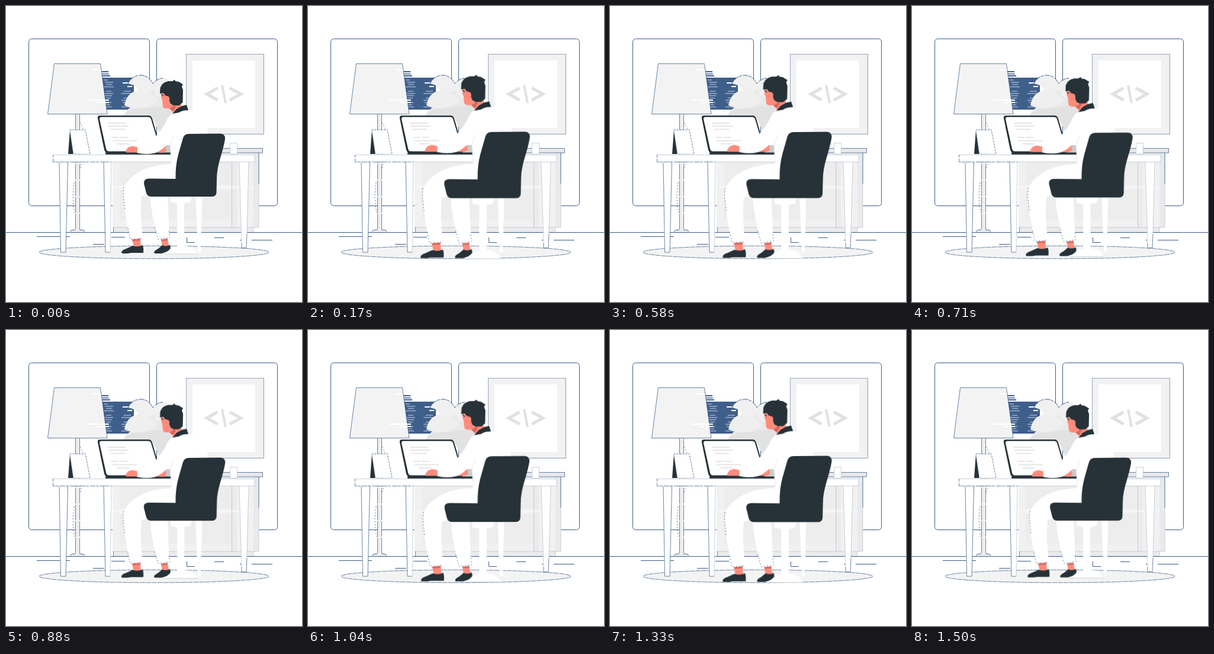
An HTML page that plays this animation: 500x500 px, repeating every 1540 ms.

```html
<!DOCTYPE html>
<html lang="en">
<head>
<meta charset="utf-8">
<title>Desk work</title>
<style>
  html, body { margin: 0; width: 100%; height: 100%; overflow: hidden; background: #fff; }
  svg { display: block; width: 100%; height: 100%; }
  #worker { transform-origin: 286px 275px; }
  .w { fill: #fff; }
  .g { fill: #f1f1f1; }
  .d { fill: #263238; }
  .s { fill: #ff8b7b; }
  .e { stroke: #3a5c8c; stroke-width: 1; }
  .t { stroke: #b4bfcf; stroke-width: .7; }
  .l { fill: none; }
  .thin { stroke-width: .75; }
  .dash { stroke-dasharray: 5 2 9 1; }
  .dot { stroke-dasharray: 2 3; stroke-width: .8; }
</style>
</head>
<body>
<svg viewBox="0 0 500 500">
  <!-- room -->
  <g class="w e">
    <rect x="38.5" y="55.5" width="204" height="282" rx="5"/>
    <rect x="254.5" y="55.5" width="204" height="282" rx="5"/>
  </g>
  <path class="l e" d="M0 382.5H500M52 389.5H108M147 402.5H166M178 390.5H201M415 395.5H450M395 395.5H405M305.500 391V399.500H319M352 391.5H368"/>
  <ellipse class="e thin" fill="#f3f3f3" cx="250" cy="416" rx="194" ry="10.8" stroke-dasharray="9 1"/>

  <!-- code panel -->
  <path fill="#3f5f8b" d="M157 121H216V175H157ZM160 110H173V112H160ZM161 114H174V115.500H161ZM162 117H176V119H162Z"/>
  <g id="code" class="l" stroke="#9cafc9" stroke-width="1.5"></g>
  <path class="l" stroke="#fff" stroke-width="2" d="M197 130H222M205 136H213"/>

  <!-- plant -->
  <path fill="#e9e9e9" d="M210 160L224 146L248 132L270 122L282 135L284 184L262 218L250 188H197Q203 174 216 168Z"/>
  <path fill="#e2e2e2" d="M198 185Q210 170 240 172L284 166L283 182L260 216L246 186Z"/>
  <path fill="#f0f0f0" d="M206 131Q214 116 230 117Q246 120 252 141Q236 151 223 145Q223 134 206 131Z"/>
  <path fill="#f0f0f0" d="M248 131Q257 121 267 122L276 128L266 158L252 151Z"/>
  <path fill="#efefef" d="M200 168Q204 146 222 143Q247 144 257 160Q238 175 218 173Q209 172 200 168Z"/>
  <path class="l e dash" d="M206 131Q214 116 230 117Q242 119 248 131Q257 121 267 122"/>

  <!-- lamp -->
  <path class="e thin" fill="#f3f3f3" d="M81.500 97.500H159.500L171 182.500H70.500Z"/>
  <path class="l" stroke="#fff" stroke-width="2" d="M146 108H160M137 159H174M153 163H174"/>
  <path fill="#eee" d="M117 183H124V378Q132 378 133 382H108Q110 378 117 378Z"/>
  <path class="l e thin" stroke-dasharray="26 2" d="M117.500 183V378M124.500 183V378"/>
  <path class="l e" d="M108 381Q110 378 117 378M124 378Q132 378 133 381"/>
  <path class="l e dot" d="M115 298L113 318L114 340L117 352M125 262L127 268L125 276M125 197L131 208"/>

  <!-- wall picture -->
  <rect fill="#f2f2f2" stroke="#7d90ae" stroke-width=".8" x="304.500" y="81.500" width="131" height="135"/>
  <path fill="#e9e9eb" d="M433.500 82H435V216H305V215H433.500Z"/>
  <rect class="w" x="315" y="92" width="106" height="114"/>
  <path class="l" stroke="#e1e1e1" stroke-width="5.3" d="M357.500 138.500L339.500 148.800L357.500 159M378 138.500L396.500 148.800L378 159"/>
  <path class="l" stroke="#e1e1e1" stroke-width="4" d="M365 134L371 164"/>

  <!-- cabinet -->
  <rect class="g" x="180" y="248" width="247" height="126"/>
  <path fill="#ededed" d="M192 263H381V302H192ZM192 311H381V362H192Z"/>
  <rect fill="#eaeaeb" x="418" y="248" width="9" height="126"/>
  <path fill="#ebebec" d="M182 374H418V382H182ZM381 263H390V374H381Z"/>
  <path class="l" stroke="#f5f5f5" stroke-width="4" d="M180 306H418"/>
  <path class="l t" d="M180 374H427V248M418 374V382M381.500 263V374"/>
  <path class="l e thin" d="M181.500 374V382M427 248V300"/>
  <rect class="e thin" fill="#e8e8ea" x="178" y="240.500" width="255.500" height="7.500"/>

  <!-- table -->
  <path class="w" d="M79 251H420V263H410L406 409H398L394 263H333L329 416H324L318 263H178L176 416H168L165 263H104L101 416H92L90 263H79Z"/>
  <path class="l e thin" d="M90 264L92.500 416H101L104.500 264M165 264L168 416H176M398 400V408.500H406L407 385"/>
  <path class="l t" d="M178 264L176 416M394 264L398 400M410 264L407 385M79.500 251.500H420V263.500H178"/>
  <path class="l e thin dash" d="M79.500 251V263.500H178"/>
  <path class="w t" d="M378.500 250V231.500H390.500V250Z"/>

  <!-- photo stand -->
  <path class="d" d="M108 209L114 250H105Z"/>
  <path class="w t" d="M108 209.500H134L142 250H114Z"/>
  <path class="l e dot" d="M108 209H134L142 250"/>

  <!-- laptop -->
  <path fill="#c9cbcc" d="M262 235H277L282 248H262Z"/>
  <path class="d" d="M159 185H241Q245 185 247 190L262 242Q263 248 258 249H174Q168 249 166 243L155 190Q154 185 159 185Z"/>
  <path class="w" d="M161 187.500H240Q244 187.500 245 191L260 241Q260 245.500 256 245.500H174Q170 245.500 169 241L158 191Q158 187.500 161 187.500Z"/>
  <path class="l" stroke="#e6e6e6" stroke-width="2" d="M172 198H202M173 203H207M176 208.500H201M178 222H190M192 222H205M180 227.500H221M187 233H208"/>
  <rect class="d" x="168" y="247.500" width="116" height="3.200" rx="1"/>

  <g id="worker">
    <!-- stool -->
    <path class="w" d="M266 419Q270 409 289 406V333L278 331V321H314L311 331L301 333V405Q320 406 323 419Z"/>
    <path class="l t" d="M266 419H323"/>

    <!-- legs -->
    <path class="w" d="M281 267Q246 268 225 280Q199 295 198 316Q199 345 210 393L231 391Q226 350 229 321L243 318Q245 352 257 394L276 391L273 318H300V267Z"/>
    <path class="l e dot" d="M199 306L198 318L201 345M206 376L210 394L231 392M251 374L257 394L277 391L275 378"/>
    <path class="s" d="M213 394.500L227 393L228 406L216 407ZM262 394.500L273 393L275 405L264 407Z"/>
    <path fill="#d5685f" d="M213 394.500L227 393V396L214 397ZM262 394.500L273 393V396L262.500 397Z"/>
    <path class="d" d="M195 416Q196 412 203 410L214 405Q222 408 231 404Q233 410 232 417H211L206 418H196ZM250 416Q251 413 257 410L264 404Q270 407 277 403.500L278 409Q275 414 269 416L263 418H251Z"/>

    <!-- far hand -->
    <path class="s" d="M254 247.500L262 239L269 234L271 245L265 248Z"/>

    <!-- neck and face -->
    <path class="s" d="M263 145L262 154L264 159L265 170Q267 174 276 173L283 180L297 171L294 150L276 142Z"/>
    <path fill="#d5685f" d="M276 173Q282 171 284 167L287 170L282 178Z"/>
    <path class="l" stroke="#263238" stroke-width="1.300" d="M262 149L266 152"/>

    <!-- shirt and near arm -->
    <path class="w" d="M282 181L307 176Q328 178 337 190L345 240L300 292L279 270L277 234H272Q264 243 253 248Q238 252 221 248V239Q239 235 248 225Q264 209 270 196Q275 184 282 181Z"/>
    <path class="l" stroke="#e4e4e4" stroke-width=".8" d="M277 237L283 221M278 239L279 264"/>
    <path class="s" d="M202 245L206 239L213 236.500L222 238.500V247.500H203Z"/>

    <!-- hair and collar -->
    <path class="d" d="M260 148L260.500 138L264 132L268 129L274 127H281L285 124.500L286 127L292 128L299 132.500L297 136L299 142L298.500 163L292 168H283L278 165L276 160Q274 152 269 151L266 147Z"/>
    <path class="s" d="M268 153Q274 150 276 155Q277 161 273 161Q269 160 268 153Z"/>
    <path class="d" d="M281 182L288 174L297 169L305 167L308 176Q298 176 292 180Z"/>

    <!-- chair -->
    <path class="d" d="M286.500 292Q286 270 291 251L299 223Q301 216 309 216L362 215.500Q371 216 370 225C366 249 356 268 356 292L355.500 315Q355 322 348 322H246Q239 322 237 316L233 300Q232 292 241 291.500Z"/>
  </g>
</svg>
<script>
  const LOOP = 1540, FRAMES = 37, FPS = 24;

  // [ms, scale], linear between entries
  const beats = [[0, 1], [300, 1.1], [890, 1], [1200, 1.095], [1500, 1], [LOOP, 1]];

  function scaleAt(ms) {
    const i = Math.max(1, beats.findIndex(b => b[0] >= ms));
    const [t0, a] = beats[i - 1], [t1, b] = beats[i];
    return a + (b - a) * (ms - t0) / (t1 - t0);
  }

  const pulse = Array.from({ length: FRAMES }, (_, k) => ({
    offset: Math.max(0, k / FRAMES - 4 / LOOP),
    transform: `scale(${scaleAt(k * 1000 / FPS).toFixed(4)})`,
    easing: 'step-end'
  }));
  pulse.push({ offset: 1, transform: 'scale(1)' });
  document.getElementById('worker').animate(pulse, { duration: LOOP, iterations: Infinity });

  // short code lines in two columns
  let d = '';
  for (let i = 0; i < 13; i++) {
    const y = 125 + i * 3.8, w = 7 + (i * 7) % 11;
    if (i % 5 !== 4) d += `M${165 + (i % 3) * 2} ${y}h${w}`;
    if (i > 4 && i % 4 !== 3) d += `M${195 + (i % 3) * 2} ${y}h${w + 3}`;
  }
  const code = document.createElementNS('http://www.w3.org/2000/svg', 'path');
  code.setAttribute('d', d);
  document.getElementById('code').append(code);
</script>
</body>
</html>
```
